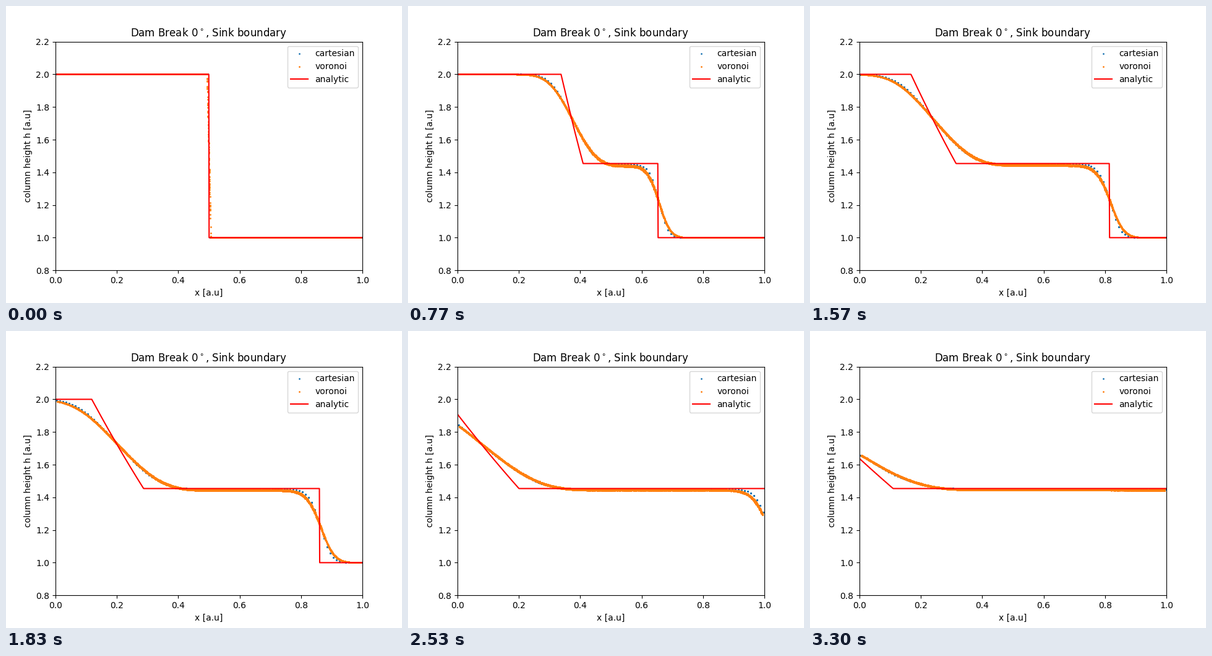
These frames come from a looping animation (640 px wide and 480 px high, 3.33 s). A matplotlib script:

```python
import numpy as np
import matplotlib.pyplot as plt
from matplotlib.animation import FuncAnimation

FRAMES = 100
LOOP_MS = 3330
DT = 0.001            # solver step
STEPS = 5             # solver steps per frame
H_LEFT, H_RIGHT = 2.0, 1.0
H_MID = 1.4538        # height between rarefaction and shock
U_MID = 2 * (np.sqrt(H_LEFT) - np.sqrt(H_MID))
SHOCK = H_MID * U_MID / (H_MID - H_RIGHT)


def analytic(x, t):
    """Exact dam break height for g = 1."""
    xi = (x - 0.5) / max(t, 1e-9)
    c = np.sqrt(H_LEFT)
    fan = ((2 * c - xi) / 3) ** 2
    return np.select([xi <= -c, xi <= U_MID - np.sqrt(H_MID), xi <= SHOCK],
                     [H_LEFT, fan, H_MID], H_RIGHT)


def rusanov_step(q, dx):
    h, m = q = np.pad(q, ((0, 0), (1, 1)), mode="edge")
    u = m / h
    f = np.array([m, m * u + h * h / 2])
    speed = np.abs(u) + np.sqrt(h)
    a = np.maximum(speed[:-1], speed[1:])
    flux = (f[:, :-1] + f[:, 1:] - a * (q[:, 1:] - q[:, :-1])) / 2
    return q[:, 1:-1] - DT / dx * (flux[:, 1:] - flux[:, :-1])


def simulate(cells):
    """Cell centres and the (height, momentum) state of every frame."""
    dx = 1 / cells
    x = (np.arange(cells) + 0.5) * dx
    q = np.array([np.where(x < 0.5, H_LEFT, H_RIGHT), np.zeros(cells)])
    states = [q]
    for _ in range(FRAMES - 1):
        for _ in range(STEPS):
            q = rusanov_step(q, dx)
        states.append(q)
    return x, states


x_cart, cart_states = simulate(100)
x_coarse, coarse_states = simulate(80)   # irregular cells diffuse more

ROWS = 20
rng = np.random.default_rng(4)
N_VOR = 6400
x_vor = np.clip(rng.random(N_VOR), 0.006, 0.994)
shift, spread = rng.uniform(-1, 1, (2, N_VOR))


def voronoi_height(i):
    """Coarse solution with mesh scatter that grows with the flow speed."""
    h, m = coarse_states[i]
    w = np.interp(x_vor, x_coarse, m / h) / U_MID
    bias = 0.004 + 0.001 / (i * STEPS * DT + 0.1)
    height = np.interp(x_vor + 0.0025 * w * shift, x_coarse, h)
    return height - w ** 2 * bias * (1 + 0.6 * spread)


fig, ax = plt.subplots(figsize=(6.4, 4.8), dpi=100)
x_line = np.linspace(0, 1, 1000)
cart = ax.scatter([], [], s=1, color="tab:blue", label="cartesian")
vor = ax.scatter([], [], s=1, color="tab:orange", label="voronoi")
line, = ax.plot([], [], color="red", label="analytic")
ax.set(xlim=(0, 1), ylim=(0.8, 2.2), xlabel="x [a.u]",
       ylabel="column height h [a.u]",
       title=r"Dam Break 0$^\circ$, Sink boundary")
ax.legend(loc="upper right")


def update(i):
    cart.set_offsets(np.tile(np.c_[x_cart, cart_states[i][0]], (ROWS, 1)))
    vor.set_offsets(np.c_[x_vor, voronoi_height(i)])
    line.set_data(x_line, analytic(x_line, i * STEPS * DT))
    return cart, vor, line


anim = FuncAnimation(fig, update, frames=FRAMES, interval=LOOP_MS / FRAMES,
                     repeat=True, repeat_delay=0)
plt.show()
```
